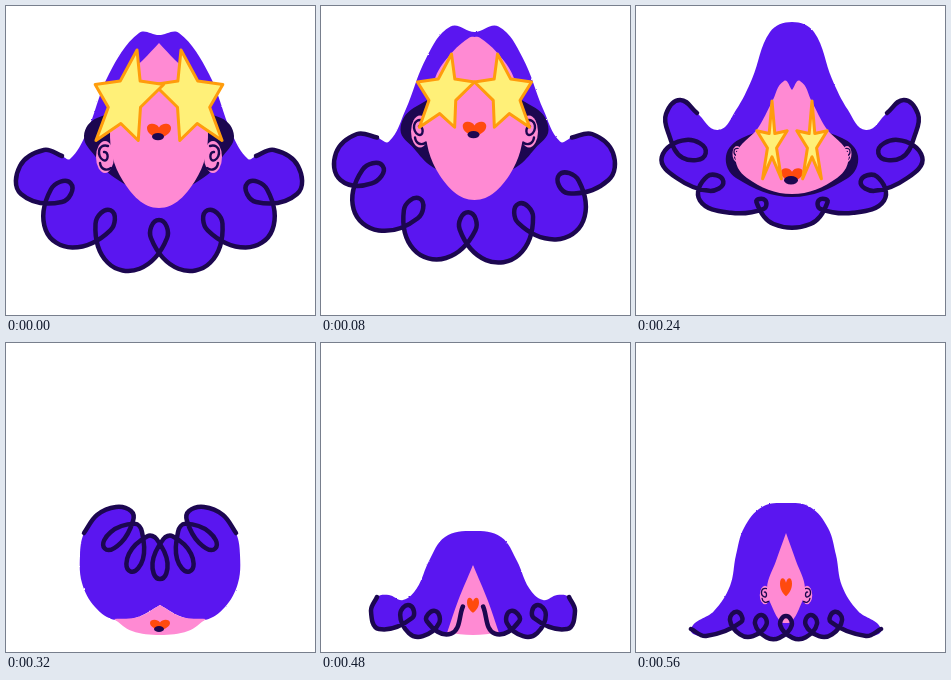
An HTML page for the animation above (640 ms loop, 309 by 309 pixels).

```html
<!DOCTYPE html>
<html lang="en">
<head>
<meta charset="utf-8">
<title>Bouncing hair</title>
<style>
  html, body { margin: 0; width: 100%; height: 100%; overflow: hidden; background: #fff; }
  svg { display: block; width: 100%; height: 100%; }
  .pose { visibility: hidden; animation: show 640ms step-end infinite; }
  @keyframes show { 0% { visibility: visible; } 12.5%, 100% { visibility: hidden; } }
  .hair { fill: #5a16f0; filter: url(#rough); }
  .shade, .mouth { fill: #1c0750; }
  .face, .lobe { fill: #ff8ad3; }
  .ink { fill: none; stroke: #1c0750; stroke-width: 4.5; stroke-linecap: round; stroke-linejoin: round; }
  .ear .ink { stroke-width: 2.4; }
  .star { fill: #fff078; stroke: #ff9c0c; stroke-width: 3; stroke-linejoin: round; }
  .lips { fill: #ff4a0e; }
</style>
</head>
<body>
<svg id="stage" viewBox="0 0 309 309">
  <filter id="rough" x="-5%" y="-5%" width="110%" height="110%">
    <feTurbulence type="fractalNoise" baseFrequency=".4" numOctaves="1" seed="4"/>
    <feDisplacementMap in="SourceGraphic" scale="2" xChannelSelector="R" yChannelSelector="G"/>
  </filter>
</svg>
<script>
const STEP = 80;
const LOOP = 640;

// Outlines list one half only, as "distance from the axis,y"; the other half is mirrored.
// rim: curls sit at even angles on an ellipse and point at height `aim`;
//      curl = their length below and at the sides, negative when they point outwards.
const wide = {
  axis: 153,
  crown: '0,29 20,27 50,68 73,128 89,153',
  lobe: '97,150 115,144 139,160 138,188',
  rim: { count: 5, step: 23.5, gap: 0, tilt: 0, y: 100, rx: 160, ry: 150, aim: 100, curl: [36, 40], bulge: 0.25 },
  shade: '0,100 62,112 75,130 64,150 44,172 0,190',
  face: '0,37 0,37 16,54 34,72 49,125 36,175 0,202',
  ear: { x: 54, y: 151, size: 1 },
  star: { x: 33, y: 94, rx: 36, ry: 50, lean: 11, inner: 0.47 },
  lips: { y: 125, w: 24, h: 14, mouth: 6 }
};

const high = {
  axis: 154,
  crown: '0,23 28,14 46,35 65,80 82,118',
  lobe: '98,113 120,112 138,134 130,160',
  rim: { count: 5, step: 28, gap: 0, tilt: -6, y: 95, rx: 142, ry: 138, aim: 95, curl: [34, 38], bulge: 0.22 },
  shade: '0,60 60,92 73,118 58,134 40,150 0,170',
  face: '0,25 10,26 28,38 44,70 50,112 34,163 0,186',
  ear: { x: 55, y: 100, size: 1 },
  star: { x: 29, y: 83, rx: 24, ry: 31, lean: 5, inner: 0.47 },
  lips: { y: 121, w: 23, h: 14, mouth: 6 }
};

const falling = {
  axis: 156,
  crown: '0,16 22,26 40,73 56,104 74,124',
  lobe: '95,107 112,94 126,108 124,126',
  rim: { count: 6, step: 33, gap: 0, tilt: 0, y: 128, rx: 130, ry: 80, aim: 165, curl: [12, 44], bulge: 0.18 },
  shade: '0,120 50,132 66,150 56,172 0,191',
  face: '0,84 0,84 8,75 20,96 34,122 56,149 45,172 0,188',
  ear: { x: 55, y: 148, size: 0.5 },
  star: { x: 20, y: 138, rx: 16, ry: 43, lean: 0, inner: 0.3 },
  lips: { y: 169, w: 22, h: 13, mouth: 7 }
};

const landing = {
  axis: 154,
  crown: '0,262 0,262 22,274 45,277 65,264 78,240 80,212',
  lobe: '76,190 63,172 44,164 29,168 27,178',
  rim: { count: 5, step: 26, gap: 0, tilt: 0, y: 150, rx: 42, ry: 54, aim: 150, curl: [-32, -31], bulge: 0.35 },
  face: '0,262 0,262 22,274 46,276 46,276 28,288 0,292',
  lips: { y: 282, w: 20, h: 10, mouth: 5 }
};

const flat = {
  axis: 153,
  crown: '0,222 22,227 50,244 66,250 69,237 84,235',
  lobe: '96,240 105,262 97,286',
  rim: { count: 4, step: 5.6, gap: 10.6, tilt: 0, y: 52, rx: 250, ry: 242, aim: 52, curl: [28, 28], bulge: 0.15 },
  part: 250,
  face: '0,250 0,250 12,270 31,291 31,291 0,293',
  lips: { y: 279, w: 12, h: 12, mouth: 0 }
};

const rising = {
  axis: 152,
  crown: '0,188 28,194 44,218 56,245 70,257 84,252',
  lobe: '96,254 102,268 94,286',
  rim: { count: 4, step: 6.6, gap: 6.4, tilt: 0, y: 52, rx: 250, ry: 242, aim: 52, curl: [23, 23], bulge: 0.15 },
  part: 223,
  face: '0,222 0,222 15,258 26,290 26,290 0,292',
  lips: { y: 262, w: 12, h: 14, mouth: 0 }
};

const tall = {
  axis: 150,
  crown: '0,160 24,164 42,185 50,212 56,243 72,268',
  lobe: '95,286 80,293',
  rim: { count: 5, step: 5, gap: 0, tilt: 0, y: -8, rx: 300, ry: 300, aim: -8, curl: [19, 19], bulge: 0.12 },
  face: '0,190 0,190 10,218 19,245 13,266 5,279 0,280',
  ear: { x: 21, y: 252, size: 0.58 },
  lips: { y: 244, w: 12, h: 17, mouth: 0 }
};

// Average of two poses that share one structure.
function between(a, b) {
  const number = /-?\d+(\.\d+)?/g;
  const values = JSON.stringify(b).match(number);
  let i = 0;
  return JSON.parse(JSON.stringify(a).replace(number, v => (+v + +values[i++]) / 2));
}

const lerp = (a, b, t) => a + (b - a) * t;

function unit(x, y) {
  const d = Math.hypot(x, y) || 1;
  return [x / d, y / d];
}

// Smooth curve through the points; a doubled point makes a corner.
function curve(points, closed) {
  const n = points.length;
  const at = i => points[closed ? (i + n) % n : Math.max(0, Math.min(n - 1, i))];
  const tangent = i => unit(at(i + 1)[0] - at(i - 1)[0], at(i + 1)[1] - at(i - 1)[1]);
  let path = `M${points[0]}`;
  for (let i = 0; i < (closed ? n : n - 1); i++) {
    const a = at(i), b = at(i + 1), s = tangent(i), e = tangent(i + 1);
    const k = Math.hypot(b[0] - a[0], b[1] - a[1]) * 0.36;
    path += `C${a[0] + s[0] * k},${a[1] + s[1] * k} ${b[0] - e[0] * k},${b[1] - e[1] * k} ${b}`;
  }
  return path + (closed ? 'Z' : '');
}

// Left half in order, and its mirror image in reverse without the axis points.
function halves(text, axis) {
  const points = text.split(' ').map(pair => pair.split(',').map(Number));
  return {
    left: points.map(([x, y]) => [axis - x, y]),
    right: points.filter(([x]) => x).map(([x, y]) => [axis + x, y]).reverse()
  };
}

function symmetric(text, axis) {
  const { left, right } = halves(text, axis);
  return curve([...left, ...right], true);
}

// Curls joined by round scallops, or by a parting in the middle.
function rimPoints({ axis, part, rim }) {
  const outward = Math.sign(rim.curl[0]);
  const middle = (rim.count - 1) / 2;
  const curls = Array.from({ length: rim.count }, (_, i) => {
    const k = i - middle;
    const angle = (k * rim.step + Math.sign(k) * rim.gap + rim.tilt) * Math.PI / 180;
    const x = axis + rim.rx * Math.sin(angle), y = rim.y + rim.ry * Math.cos(angle);
    const length = lerp(...rim.curl, Math.sin(angle) ** 2);
    const [ux, uy] = unit(axis - x, rim.aim - y);
    const w = 3 * outward + length * 0.14;
    const mx = x + ux * length / 2, my = y + uy * length / 2;
    const sx = -uy * Math.abs(w), sy = ux * Math.abs(w);
    return { x, y, loop: [[mx + sx, my + sy], [x + ux * length, y + uy * length], [mx - sx, my - sy]] };
  });
  return curls.flatMap((a, i) => {
    const b = curls[i + 1];
    if (!b) return a.loop;
    const on = t => [lerp(a.x, b.x, t), lerp(a.y, b.y, t)];
    if (part && i === middle - 0.5) {
      const rise = lerp(a.y, part, 0.4);
      return [...a.loop, on(0.24), [on(0.38)[0], rise], [axis, part], [axis, part], [on(0.62)[0], rise], on(0.76)];
    }
    const [nx, ny] = unit((a.x + b.x) / 2 - axis, (a.y + b.y) / 2 - rim.y);
    const push = outward * rim.bulge * Math.hypot(b.x - a.x, b.y - a.y);
    return [...a.loop, ...[0.25, 0.75].map(t => [on(t)[0] + nx * push, on(t)[1] + ny * push])];
  });
}

const shape = (name, d, extra = '') => `<path class="${name}" d="${d}" ${extra}/>`;

function star({ x, y, rx, ry, lean, inner }, axis, side) {
  const points = Array.from({ length: 10 }, (_, i) => {
    const r = i % 2 ? inner : 1, angle = i * Math.PI / 5;
    const up = r * Math.cos(angle);
    return [axis + side * (x + rx * r * Math.sin(angle) - lean * up), y - ry * up];
  });
  return shape('star', `M${points.join('L')}Z`);
}

function ear({ x, y, size }, axis, side) {
  return `<g class="ear" transform="translate(${axis + side * x} ${y}) scale(${-side * size} ${size})">
    <ellipse class="lobe" rx="9" ry="16"/>
    ${shape('ink', 'M3-11C-8-14-8 0-2 3S4-6-1-5M-5 6C-4 13 2 14 6 11')}</g>`;
}

function lips({ y, w, h, mouth }, axis) {
  const heart = 'M0-.25C.12-.62.5-.6.5-.2C.5.15.25.4 0 .55C-.25.4-.5.15-.5-.2C-.5-.6-.12-.62 0-.25Z';
  return shape('lips', heart, `transform="translate(${axis} ${y}) scale(${w} ${h})"`) +
    (mouth ? `<ellipse class="mouth" cx="${axis - 1}" cy="${y + h * 0.4}" rx="${mouth}" ry="${mouth * 0.6}"/>` : '');
}

function draw(pose, index) {
  const { axis } = pose;
  const crown = halves(pose.crown, axis), lobe = halves(pose.lobe, axis);
  const edge = [...lobe.left, ...rimPoints(pose), ...lobe.right];
  const half = edge.length / 2;
  const strands = pose.part ? [edge.slice(0, half - 1), edge.slice(half + 1)] : [edge];
  const pair = (make, part) => part ? make(part, axis, 1) + make(part, axis, -1) : '';
  return `<g class="pose" style="animation-delay:${index * STEP - LOOP}ms">
    ${shape('hair', curve([...edge, ...crown.right, ...crown.left], true))}
    ${pose.shade ? shape('shade', symmetric(pose.shade, axis)) : ''}
    ${pair(ear, pose.ear)}
    ${shape('face', symmetric(pose.face, axis))}
    ${lips(pose.lips, axis)}
    ${pair(star, pose.star)}
    ${strands.map(points => shape('ink', curve(points))).join('')}</g>`;
}

const poses = [wide, between(wide, high), high, falling, landing, flat, rising, tall];
document.getElementById('stage').insertAdjacentHTML('beforeend', poses.map(draw).join(''));
</script>
</body>
</html>
```
